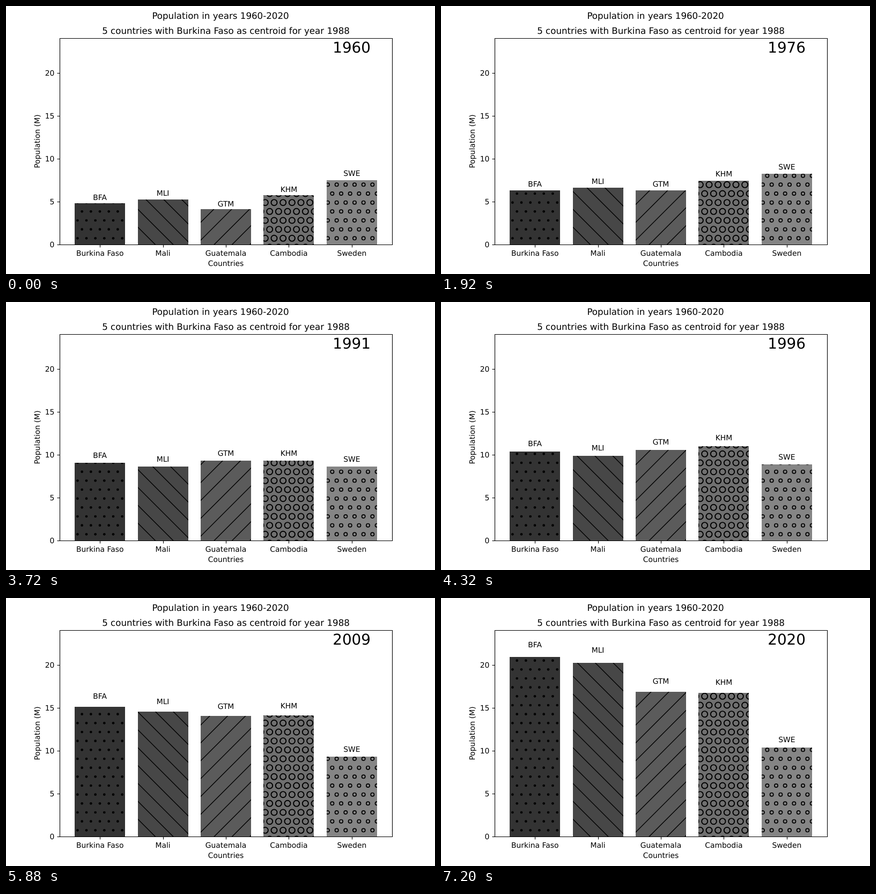
Recreate the animation shown at these times as an HTML page. Size 800 by 500 pixels, loop 7.32 s.

```html
<!DOCTYPE html>
<html lang="en">
<head>
<meta charset="utf-8">
<title>Population in years 1960-2020</title>
<style>
  html, body { margin: 0; width: 100%; height: 100%; overflow: hidden; background: #fff; }
  svg { display: block; width: 800px; height: 500px; }
  text { font-family: "DejaVu Sans", sans-serif; font-size: 13.889px; text-rendering: geometricPrecision; }
  .title { font-size: 16.667px; }
  .year { font-size: 27.778px; }
</style>
</head>
<body>
<svg id="chart" viewBox="0 0 800 500"></svg>
<script>
const NS = "http://www.w3.org/2000/svg";
const svg = document.getElementById("chart");

const STEP_MS = 120, FIRST_YEAR = 1960, YEARS = 61;
const LEFT = 100, RIGHT = 720, TOP = 60, BASE = 445;
const UNIT = (RIGHT - LEFT) / 5.28;         // one bar slot, with 5% margins
const SCALE = (BASE - TOP) / 24.04;         // pixels per million
const TILE = 100, CELL = TILE / 6;          // hatch tile

// Population in millions, evenly spaced from 1960 to 2020
const countries = [
  { name: "Burkina Faso", code: "BFA", fill: "#333333", hatch: dots(2.36, 0),
    pop: [4.829, 5.175, 5.625, 6.155, 6.823, 7.728, 8.811, 10.09, 11.608, 13.422, 15.605, 18.111, 20.903] },
  { name: "Mali", code: "MLI", fill: "#474747", hatch: diagonals(1),
    pop: [5.264, 5.568, 5.949, 6.482, 7.09, 7.832, 8.45, 9.604, 10.946, 12.776, 15.049, 17.439, 20.251] },
  { name: "Guatemala", code: "GTM", fill: "#5b5b5b", hatch: diagonals(-1),
    pop: [4.128, 4.78, 5.45, 6.17, 6.97, 7.92, 9.05, 10.3, 11.589, 13.096, 14.26, 15.568, 16.858] },
  { name: "Cambodia", code: "KHM", fill: "#707070", hatch: dots(5.54, 1.97),
    pop: [5.722, 6.106, 6.467, 6.735, 6.997, 7.305, 7.525, 7.12, 6.694, 7.06, 7.743, 8.34, 8.974,
          9.81, 10.656, 11.46, 12.155, 12.75, 13.274, 13.78, 14.312, 14.9, 15.521, 16.13, 16.719] },
  { name: "Sweden", code: "SWE", fill: "#858585", hatch: dots(3.17, 1.72),
    pop: [7.485, 7.734, 8.043, 8.192, 8.311, 8.35, 8.559, 8.827, 8.872, 9.03, 9.378, 9.799, 10.353] }
];

function add(tag, attrs, parent = svg) {
  const node = document.createElementNS(NS, tag);
  for (const key in attrs) node.setAttribute(key, attrs[key]);
  parent.appendChild(node);
  return node;
}

function label(str, x, y, attrs = {}) {
  const node = add("text", { x, y, "text-anchor": "middle", ...attrs });
  node.textContent = str;
  return node;
}

function line(d) {
  add("path", { d, fill: "none", stroke: "#000", "stroke-width": 1.11 });
}

// Staggered circles: rings when a stroke width is given, discs otherwise
function dots(r, stroke) {
  return tile => {
    const paint = stroke ? { fill: "none", stroke: "#000", "stroke-width": stroke } : { fill: "#000" };
    for (let row = 0; row <= 6; row++)
      for (let col = 0; col <= 6; col++)
        add("circle", { cx: (col + row % 2 / 2) * CELL, cy: row * CELL, r, ...paint }, tile);
  };
}

// Lines at 45 degrees, falling (1) or rising (-1) to the right
function diagonals(dir) {
  return tile => {
    let d = "";
    for (let k = -4; k <= 7; k++) {
      const y = k * TILE / 3;
      d += dir > 0 ? `M-10 ${y - 10}L110 ${y + 110}` : `M-10 ${y + 10}L110 ${y - 110}`;
    }
    add("path", { d, stroke: "#000", "stroke-width": 1.39 }, tile);
  };
}

// Cubic through evenly spaced points, u in 0..1
function curve(p, u) {
  const last = p.length - 1;
  const x = u * last, i = Math.min(Math.floor(x), last - 1), t = x - i;
  const a = p[i], b = p[i + 1];
  const ma = i > 0 ? (b - p[i - 1]) / 2 : b - a;
  const mb = i + 2 <= last ? (p[i + 2] - a) / 2 : b - a;
  const s = t * t * (3 - 2 * t);
  return a + (b - a) * s + ma * t * (1 - t) ** 2 - mb * t * t * (1 - t);
}

const defs = add("defs", {});
const bars = countries.map((c, i) => {
  const mid = LEFT + (0.64 + i) * UNIT;
  const x = Math.round(mid - 0.4 * UNIT);
  const width = Math.round(mid + 0.4 * UNIT) - x;
  const tile = add("pattern", {
    id: "hatch" + i, width: TILE, height: TILE, patternUnits: "userSpaceOnUse"
  }, defs);
  c.hatch(tile);
  const rects = [c.fill, `url(#hatch${i})`].map(fill => add("rect", { x, width, fill }));
  return { mid, rects, pop: c.pop };
});

line(`M${LEFT + .5} ${TOP + .5}H${RIGHT + .5}V${BASE + .5}H${LEFT + .5}Z`);

for (let v = 0; v <= 20; v += 5) {
  const y = Math.round(BASE - v * SCALE);
  line(`M95.5 ${y + .5}H100.5`);
  label(v, 90.3, y + 5, { "text-anchor": "end" });
}

bars.forEach((bar, i) => {
  line(`M${Math.round(bar.mid) + .5} 445.5V450.5`);
  label(countries[i].name, bar.mid, 466);
  bar.tag = label(countries[i].code, bar.mid, 0);
});

label("Population in years 1960-2020", 400, 24, { class: "title" });
label("5 countries with Burkina Faso as centroid for year 1988", 410, 52, { class: "title" });
label("Countries", 410, 485);
label("Population (M)", 0, 0, { transform: "translate(63 252.5) rotate(-90)" });
const yearText = label("", 644.6, 87, { class: "year" });

let shown = -1;
function show(n) {
  if (n === shown) return;
  shown = n;
  yearText.textContent = FIRST_YEAR + n;
  for (const bar of bars) {
    const h = curve(bar.pop, n / (YEARS - 1)) * SCALE;
    const y = Math.round(BASE - h);
    for (const rect of bar.rects) {
      rect.setAttribute("y", y);
      rect.setAttribute("height", BASE - y);
    }
    bar.tag.setAttribute("y", Math.round(BASE - 1.05 * h) - 2);
  }
}

const start = performance.now();
function tick() {
  show(Math.floor((performance.now() - start) / STEP_MS) % YEARS);
  requestAnimationFrame(tick);
}
tick();
</script>
</body>
</html>
```
